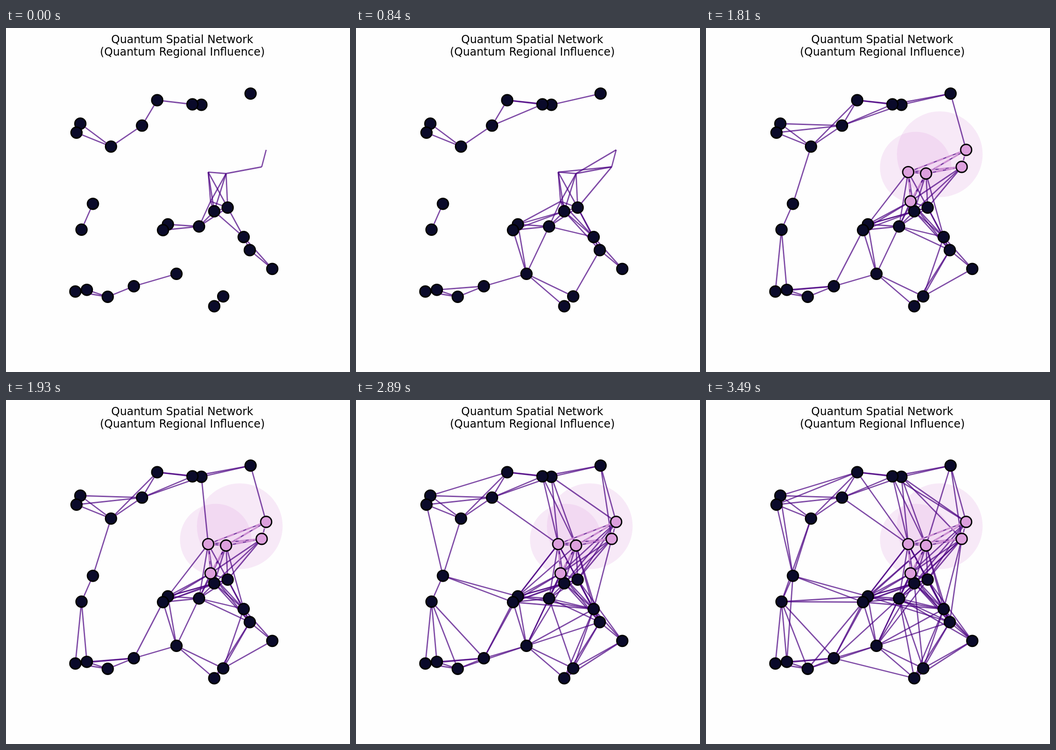
These frames come from a looping animation (748x748 px, 3610 ms). An HTML page with a canvas:

```html
<!DOCTYPE html>
<html lang="en">
<head>
<meta charset="utf-8">
<title>Quantum Spatial Network</title>
<style>
  html, body { margin: 0; width: 100%; height: 100%; overflow: hidden; background: #fefefe; }
  canvas { display: block; width: 748px; height: 748px; }
</style>
</head>
<body>
<canvas id="stage" width="748" height="748"></canvas>
<script>
const ctx = document.getElementById("stage").getContext("2d");
const LOOP = 3610, STEP = 120, REVEAL = 15;

const dark = [
  [531.8, 142.6], [424.9, 167], [405.4, 166], [328.8, 157], [295.8, 212.2],
  [161.6, 208], [153.3, 227.5], [228.3, 257.8], [189, 382.3], [164.2, 438.5],
  [150.8, 573], [175.8, 569.3], [221.2, 584.5], [278, 561.5], [370.7, 534.5],
  [352, 427], [341.4, 439.5], [419.8, 431.5], [452.8, 398.5], [482, 390.5],
  [516.8, 454.5], [530.1, 483], [579, 523.8], [472.3, 583.6], [452.8, 605]
];
const pink = [[439.7, 313.3], [478.5, 316.5], [556, 302], [565.7, 265], [444.8, 377]];
const nodes = [...dark, ...pink];

const regions = [
  { x: 508.3, y: 274.5, r: 93.2 },
  { x: 456, y: 303.5, r: 77.7 }
];

const dist = ([x1, y1], [x2, y2]) => Math.hypot(x2 - x1, y2 - y1);

function eachPair(list, visit) {
  list.forEach((a, i) => list.slice(i + 1).forEach(b => visit(a, b)));
}

function line(a, b) {
  ctx.beginPath();
  ctx.moveTo(...a);
  ctx.lineTo(...b);
  ctx.stroke();
}

function disc(x, y, r, fill) {
  ctx.beginPath();
  ctx.arc(x, y, r, 0, 2 * Math.PI);
  ctx.fillStyle = fill;
  ctx.fill();
}

function drawNodes(list, fill) {
  ctx.strokeStyle = "#000";
  ctx.lineWidth = 2.8;
  for (const [x, y] of list) {
    disc(x, y, 12, fill);
    ctx.stroke();
  }
}

// Any two nodes closer than the growing reach are joined.
function drawEdges(reach) {
  ctx.strokeStyle = "rgba(75, 0, 130, 0.7)";
  ctx.lineWidth = 2.8;
  eachPair(nodes, (a, b) => {
    if (dist(a, b) <= reach) line(a, b);
  });
}

function drawLinks() {
  ctx.strokeStyle = "rgba(221, 160, 221, 0.8)";
  ctx.lineWidth = 4.17;
  ctx.setLineDash([15.4, 6.7]);
  for (const { x, y, r } of regions) {
    eachPair(pink.filter(p => dist(p, [x, y]) < r), line);
  }
  ctx.setLineDash([]);
}

function drawTitle() {
  ctx.fillStyle = "#000";
  ctx.font = '23.9px "DejaVu Sans", sans-serif';
  ctx.textAlign = "center";
  ctx.fillText("Quantum Spatial Network", 383.2, 33);
  ctx.fillText("(Quantum Regional Influence)", 383.5, 60);
}

function stepAt(t) {
  return t < 1210 ? Math.min(9, Math.floor(t / STEP)) : Math.floor((t - 10) / STEP);
}

function draw(now) {
  const step = stepAt(now % LOOP);
  const revealed = step >= REVEAL;
  ctx.fillStyle = "#fefefe";
  ctx.fillRect(0, 0, 748, 748);
  drawTitle();
  if (revealed) regions.forEach(c => disc(c.x, c.y, c.r, "rgba(221, 160, 221, 0.22)"));
  drawEdges(96.58 + 3.318 * step);
  if (revealed) drawLinks();
  drawNodes(dark, "#0a0a2a");
  if (revealed) drawNodes(pink, "#dda0dd");
  requestAnimationFrame(draw);
}
requestAnimationFrame(draw);
</script>
</body>
</html>
```
